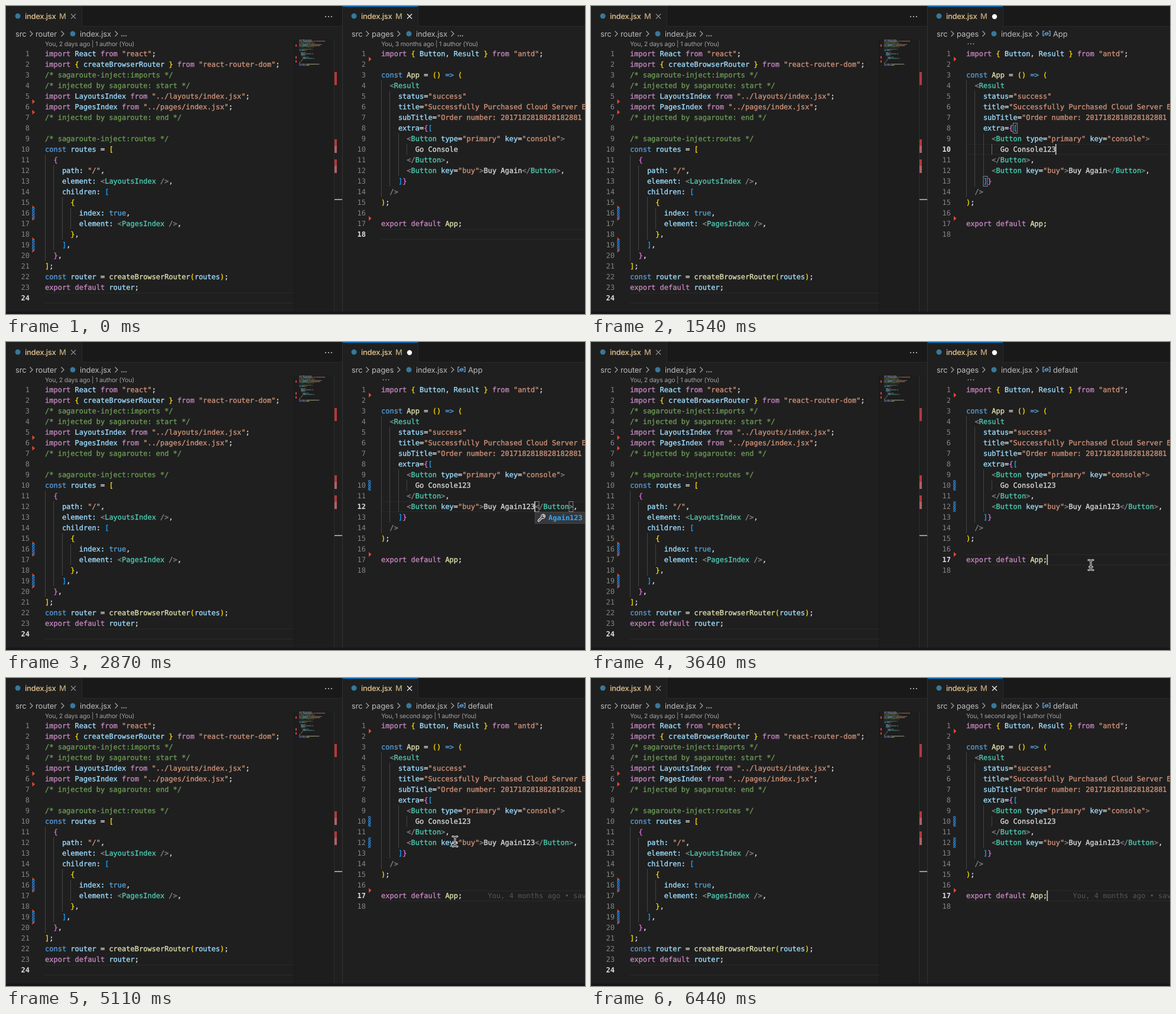
An HTML page for the animation above (6.79 s loop, 980 by 522 pixels).

```html
<!DOCTYPE html>
<html lang="en">
<head>
<meta charset="utf-8">
<title>Route editing</title>
<style>
  html, body { margin: 0; width: 100%; height: 100%; overflow: hidden; background: #1f1f1f; }
  svg { display: block; width: 980px; height: 522px; }
  text { white-space: pre; text-rendering: geometricPrecision; }
  .code { font: 12px "DejaVu Sans Mono", monospace; stroke-width: .35; }
  .ui { font: 13px Inter, sans-serif; letter-spacing: -.12px; }
  .tab { font-weight: 500; letter-spacing: -.3px; }
  .lens { font: 10.5px Inter, sans-serif; letter-spacing: -.2px; fill: #a2a2a2; }
  .num { text-anchor: end; fill: #858585; }
  .num.on { fill: #e0e0e0; font-weight: 700; }
  .line { fill: none; stroke: #aaa; }
</style>
</head>
<body>
<svg viewBox="0 0 980 522">
  <defs>
    <pattern id="hatch" width="3" height="3" patternUnits="userSpaceOnUse" patternTransform="rotate(-45)">
      <rect width="3" height="3" fill="#17324a"/>
      <rect width="3" height="1.7" fill="#2f86d2"/>
    </pattern>
    <path id="beam" d="M-4-8.5Q-.5-8.5 0-6Q.5-8.5 4-8.5M0-6V6M-4 8.5Q-.5 8.5 0 6Q.5 8.5 4 8.5M-2.5 3H2.5"/>
  </defs>
  <g id="back"></g>
  <g id="live"></g>
  <g id="pointer" fill="none" stroke-linecap="round">
    <use href="#beam" stroke="#f0f0f0" stroke-width="3"/>
    <use href="#beam" stroke="#1c1c1c" stroke-width="1.1"/>
  </g>
</svg>
<script>
const LOOP = 6790, STEP = 70, CHAR = 7.224;
const LEFT = 66, RIGHT = 635;
const colors = {
  k: '#c586c0', b: '#569cd6', v: '#9cdcfe', s: '#ce9178', f: '#dcdcaa', t: '#4ec9b0', c: '#6a9955',
  p: '#d8d8d8', y: '#ffd700', m: '#da70d6', u: '#179fff', g: '#808080', n: '#4fc1ff'
};

// "~" plus a colour key starts each token
const leftCode = [
  '~kimport ~vReact ~kfrom ~s"react"~p;',
  '~kimport ~y{ ~vcreateBrowserRouter ~y} ~kfrom ~s"react-router-dom"~p;',
  '~c/* sagaroute-inject:imports */',
  '~c/* injected by sagaroute: start */',
  '~kimport ~vLayoutsIndex ~kfrom ~s"../layouts/index.jsx"~p;',
  '~kimport ~vPagesIndex ~kfrom ~s"../pages/index.jsx"~p;',
  '~c/* injected by sagaroute: end */',
  '',
  '~c/* sagaroute-inject:routes */',
  '~bconst ~vroutes ~p= ~y[',
  '~m  {',
  '~v    path: ~s"/"~p,',
  '~v    element: ~g<~tLayoutsIndex ~g/>~p,',
  '~v    children: ~u[',
  '~y      {',
  '~v        index: ~btrue~p,',
  '~v        element: ~g<~tPagesIndex ~g/>~p,',
  '~y      }~p,',
  '~u    ]~p,',
  '~m  }~p,',
  '~y]~p;',
  '~bconst ~vrouter ~p= ~fcreateBrowserRouter~y(~vroutes~y)~p;',
  '~kexport default ~vrouter~p;',
  ''
];
const rightCode = (go, buy) => [
  '~kimport ~y{ ~vButton~p, ~vResult ~y} ~kfrom ~s"antd"~p;',
  '',
  '~bconst ~fApp ~p= ~y() ~b=> ~y(',
  '~g  <~tResult',
  '~v    status~p=~s"success"',
  '~v    title~p=~s"Successfully Purchased Cloud Server E',
  '~v    subTitle~p=~s"Order number: 2017182818828182881',
  '~v    extra~p=~m{~u[',
  '~g      <~tButton ~vtype~p=~s"primary" ~vkey~p=~s"console"~g>',
  '~p        Go Console' + go,
  '~g      </~tButton~g>~p,',
  '~g      <~tButton ~vkey~p=~s"buy"~g>~pBuy Again' + buy + '~g</~tButton~g>~p,',
  '~u    ]~m}',
  '~g  />',
  '~y)~p;',
  '',
  '~kexport default ~fApp~p;',
  ''
];

const esc = s => s.replace(/&/g, '&amp;').replace(/</g, '&lt;');
const tokens = line => line.split('~').slice(1).map(s => [colors[s[0]], s.slice(1)]);
const rowTop = n => 54 + 18 * n;
const rect = (x, y, w, h, fill, more = '') => `<rect x="${x}" y="${y}" width="${w}" height="${h}" fill="${fill}" ${more}/>`;
const text = (x, y, s, cls, fill = '', more = '') =>
  `<text x="${x}" y="${y}" class="${cls}" ${fill && `fill="${fill}"`} ${more}>${esc(s)}</text>`;
const path = (d, stroke = '#aaa', w = 1) => `<path d="${d}" class="line" style="stroke:${stroke};stroke-width:${w}"/>`;
const dot = (x, y, r, fill) => `<circle cx="${x}" cy="${y}" r="${r}" fill="${fill}"/>`;
const icon = (x, y) => dot(x, y, 4.5, '#35799a');
const cross = (x, color) => path(`M${x - 4} 13.5l8 8m0-8l-8 8`, color, 1.2);
const chevron = x => path(`M${x - 2.5} 42.5l4.5 4.5-4.5 4.5`, '#a8a8a8', 1.2);
const dots = (x, y, gap, r, fill) => [0, 1, 2].map(i => dot(x + i * gap, y, r, fill)).join('');
const crumb = (x, s) => text(x, 51.5, s, 'ui', '#bcbcbc');
const notch = (x, y) => `<path d="M${x} ${y - 4}l4.5 4-4.5 4z" fill="#e5492f"/>`;
const stripe = (x, n) => rect(x, rowTop(n), 4.5, 18, 'url(#hatch)');
const guide = (x, col, from, to, fill = '#444') =>
  rect(Math.round(x + col * CHAR), rowTop(from), 1, 18 * (to - from + 1), fill);
const rowFrame = (x, n, w) => rect(x, rowTop(n), w, 1, '#2a2a2a') + rect(x, rowTop(n) + 17, w, 1, '#2a2a2a');

function code(lines, x, active) {
  return lines.map((line, i) => {
    const y = rowTop(i + 1) + 13.2;
    const spans = tokens(line).map(([c, s]) => `<tspan fill="${c}" stroke="${c}">${esc(s)}</tspan>`).join('');
    return text(x - 26, y, String(i + 1), 'code num' + (i + 1 === active ? ' on' : '')) +
      `<text x="${x}" y="${y}" class="code">${spans}</text>`;
  }).join('');
}

function minimap() {
  let out = '';
  leftCode.forEach((line, i) => {
    let col = 0;
    for (const [c, s] of tokens(line)) {
      for (const w of s.matchAll(/\S+/g))
        out += rect(496 + (col + w.index) * .8, 57 + i * 1.95, w[0].length * .8, 1.2, c, 'opacity=".6"');
      col += s.length;
    }
  });
  return out;
}

function backdrop() {
  let s = rect(0, 0, 980, 522, '#1f1f1f');
  s += rect(129, 0, 440, 34, '#191919') + rect(698, 0, 282, 34, '#191919');
  s += rect(129, 34, 440, 1, '#2b2b2b') + rect(698, 34, 282, 1, '#2b2b2b');
  s += rect(128, 0, 1, 35, '#2b2b2b') + rect(697, 0, 1, 35, '#2b2b2b');
  s += rect(488, 57, 67, 461, '#1d1d1d') + rect(487, 57, 1, 461, '#191919');
  s += rect(555, 57, 1, 461, '#2d2d2d') + rect(569, 0, 1, 518, '#343434');
  s += rect(570, 0, 127, 1.3, '#0078d4') + rect(0, 518, 980, 4, '#181618');

  for (const x of [0, 569])
    s += icon(x + 20, 17) + text(x + 32, 22, 'index.jsx', 'ui tab', '#e6c690') +
      text(x + 90, 22, 'M', 'ui tab', '#c4a878');
  s += cross(114, '#8a8a8a') + dots(541, 18, 5, 1.1, '#c5c5c5');

  for (const [x, dir] of [[0, 'router'], [569, 'pages']])
    s += crumb(x + 16, 'src') + chevron(x + 43) + crumb(x + 50, dir) + chevron(x + 96) +
      icon(x + 113, 47) + crumb(x + 125, 'index.jsx') + chevron(x + 187);
  s += dots(196, 50.5, 3.6, 1, '#bcbcbc');

  s += text(LEFT, 68, 'You, 2 days ago | 1 author (You)', 'lens');
  s += rowFrame(LEFT, 24, 421.5);
  s += guide(LEFT, 0, 11, 20) + guide(LEFT, 2, 12, 19) + guide(LEFT, 4, 15, 18) + guide(LEFT, 6, 16, 17);
  s += code(leftCode, LEFT, 24);
  s += [162, 180, 342, 360, 396, 414].map(y => notch(44.5, y)).join('');
  s += stripe(44, 16) + stripe(44, 19);

  s += minimap();
  s += [65, 85, 92].map(y => rect(490, y, 2, 4, '#c8453c')).join('');
  for (const [y, h, c] of [[112, 22, '#b33a3a'], [226, 11, '#b33a3a'], [237, 12, '#b0606a'], [260, 11, '#b33a3a'], [271, 12, '#b0606a']])
    s += rect(556, y, 4, h, c);
  return s + rect(556, 327, 13, 2, '#9a9a9a');
}

// latest value whose time has come
const pick = (t, keys) => keys.reduce((v, [at, val]) => t >= at ? val : v, keys[0][1]);

function sceneAt(t) {
  const typed = (...times) => '123'.slice(0, times.filter(at => t >= at).length);
  return {
    go: typed(1190, 1330, 1470),
    buy: typed(2520, 2660, 2730),
    row: pick(t, [[0, 18], [560, 10], [2380, 12], [3290, 17]]),
    caret: pick(t, [[0, false], [560, true], [1960, false], [2380, true], [3850, false],
      [4340, true], [4900, false], [5430, true], [5950, false], [6440, true]]),
    symbol: pick(t, [[0, ''], [560, 'App'], [3290, 'default']]),
    lens: pick(t, [[0, '3 months'], [1260, ''], [4480, '1 second']]),
    dirty: t >= 1190 && t < 4130,
    mark10: t >= 1680,
    mark12: t >= 2940,
    popup: pick(t, [[0, ''], [1610, 'Console123'], [2380, ''], [2800, 'Again123'], [3290, '']]),
    blame: t >= 4410
  };
}

function wrench(x, y) {
  return `<g transform="translate(${x} ${y})">` +
    path('M-5.5 4L0-1.5Q-1-5 2.5-6Q4-6.3 5-5.8L2.5-3.3L4-1.8L6.3-4.2Q7 0 3.5 1Q2.3 1.2 1.5 .8L-3.6 6Q-6.5 6.5-5.5 4Z', '#e8e8e8', 1.2) + '</g>';
}

function draw(sc) {
  const endCol = { 10: 18 + sc.go.length, 12: 33 + sc.buy.length, 17: 19, 18: 0 }[sc.row];
  const colX = c => RIGHT + c * CHAR;
  const box = (c, n) => rect(colX(c) + .2, rowTop(n) + .5, 6.8, 17, 'none', 'stroke="#888"');
  let s = rowFrame(RIGHT, sc.row, 360);
  s += guide(RIGHT, 0, 4, 14) + guide(RIGHT, 2, 5, 13) + guide(RIGHT, 4, 9, 12) +
    guide(RIGHT, 6, 10, 10, sc.row === 10 ? '#707070' : '#444');
  if (sc.row === 10) s += box(11, 8) + box(4, 13);
  if (sc.row === 12) s += box(endCol, 12) + box(endCol + 8, 12);
  s += code(rightCode(sc.go, sc.buy), RIGHT, sc.row);
  s += notch(614, 90) + notch(614, 360);
  if (sc.mark10) s += stripe(613, 10);
  if (sc.mark12) s += stripe(613, 12);

  s += sc.lens ? text(RIGHT, 68, `You, ${sc.lens} ago | 1 author (You)`, 'lens') : dots(638.5, 64, 4.5, .9, '#a2a2a2');
  s += sc.dirty ? dot(683, 18, 4.2, '#fff') : cross(683, '#f0f0f0');
  if (sc.symbol)
    s += path('M767.5 42.5h-2.5v8h2.5M774.5 42.5h2.5v8h-2.5', '#75beff', 1.2) +
      path('M768 46.5l3-2 3 1v2.5l-3 1.5-3-1zl3 1 3-2', '#75beff', 1) + crumb(782, sc.symbol);
  else s += dots(765.5, 50.5, 3.6, 1, '#bcbcbc');

  if (sc.blame) s += text(colX(25), rowTop(17) + 13.2, 'You, 4 months ago • save', 'code', '#565656');
  if (sc.caret) s += rect(colX(endCol) - .8, rowTop(sc.row), 1.7, 18, '#c4c4c4');
  if (sc.popup) {
    const x = Math.round(colX(endCol)) + .5, y = rowTop(sc.row + 1);
    s += rect(x, y + .5, 220, 19, '#37373b', 'stroke="#454545"') + wrench(x + 10.5, y + 10) +
      text(x + 22.5, y + 14, sc.popup, 'code', '#2aaaff', 'style="font-weight:700"');
  }
  return s;
}

const track = [
  [70, 915, 466], [350, 820, 290], [490, 795, 249], [1190, 795, 249],
  [1820, 840, 262], [1960, 930, 286], [2030, 930, 286], [2100, 872, 285], [2520, 872, 285],
  [2940, 880, 300], [3080, 849, 376], [3220, 846, 378], [4340, 846, 378],
  [4970, 768, 290], [5110, 760, 277], [5460, 759, 143], [5600, 759, 143], [5670, 751, 137],
  [5740, 751, 137], [5950, 562, 436], [6020, 562, 436]
];
const shown = [[70, 1190], [1820, 2520], [2940, 6020]];

function pointerAt(t) {
  const i = track.findIndex(p => p[0] > t);
  const [a, b] = [track[i - 1], track[i]];
  const u = (t - a[0]) / (b[0] - a[0]);
  return [1, 2].map(k => Math.round(a[k] + (b[k] - a[k]) * u));
}

const $ = id => document.getElementById(id);
$('back').innerHTML = backdrop();

let last = '';
function tick(now) {
  const t = Math.floor((now % LOOP) / STEP) * STEP;
  const sc = sceneAt(t), key = JSON.stringify(sc);
  if (key !== last) {
    $('live').innerHTML = draw(sc);
    last = key;
  }
  const visible = shown.some(([from, to]) => t >= from && t < to);
  $('pointer').style.display = visible ? '' : 'none';
  if (visible) $('pointer').setAttribute('transform', `translate(${pointerAt(t)})`);
  requestAnimationFrame(tick);
}
tick(0);
</script>
</body>
</html>
```
